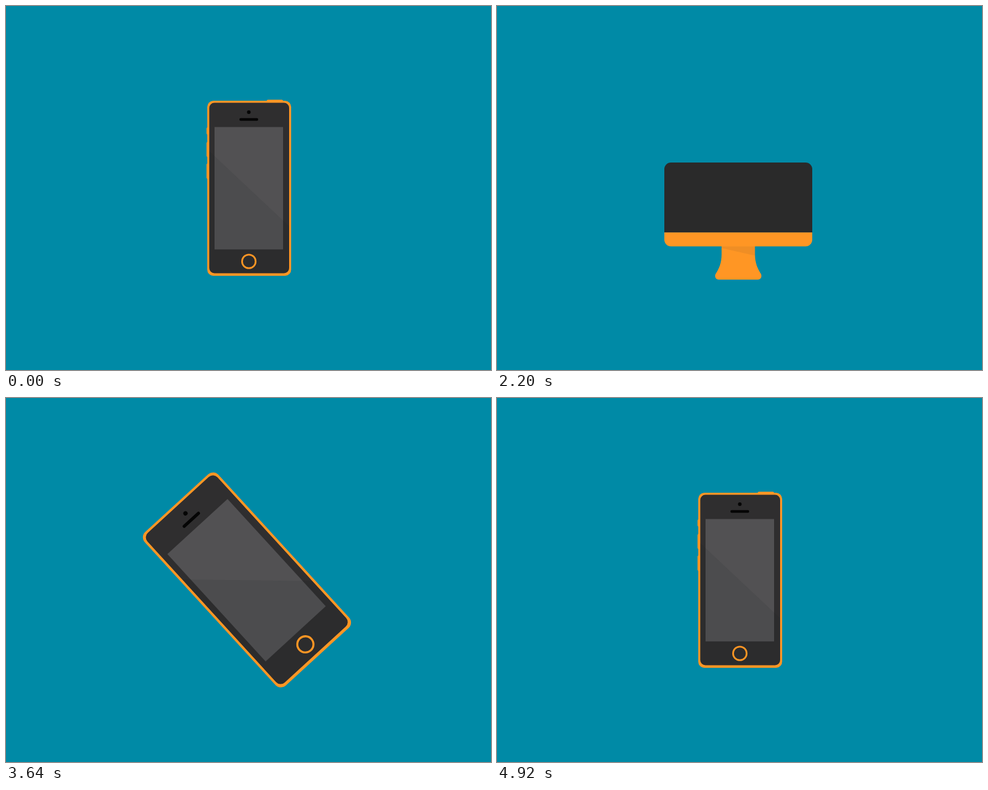
These frames come from a looping animation (800 px wide and 600 px high, 6440 ms). An HTML page with a canvas:

```html
<!DOCTYPE html>
<html lang="en">
<head>
<meta charset="utf-8">
<title>Devices</title>
<style>
  html, body { margin: 0; width: 100%; height: 100%; overflow: hidden; background: #008aa6; }
  canvas { display: block; width: 800px; height: 600px; }
</style>
</head>
<body>
<canvas id="stage" width="800" height="600"></canvas>
<script>
const ctx = document.getElementById('stage').getContext('2d');
const LOOP = 6440, STEP = 40;
const TEAL = '#008aa6', ORANGE = '#ff9624', DARK = '#2f2e2f', DEEP = '#2a2a2a', GLASS = '#525153';
const SHADE = 'rgba(20,30,30,.09)';
const STAND = new Path2D('M370.5 395.5V409C370.5 424 366 433 361 441C358 446 361 451 366 451H430C435 451 438 446 435 441C430 433 425.5 424 425.5 409V395.5Z');

const sine = p => (1 - Math.cos(Math.PI * p)) / 2;
const linear = p => p;
const easeIn = p => p * p;
const easeOut = p => 1 - (1 - p) * (1 - p);

// Value at time t from a list of [time, value] steps.
function track(t, steps, ease = sine) {
  if (t <= steps[0][0]) return steps[0][1];
  for (let i = 1; i < steps.length; i++) {
    const [t0, v0] = steps[i - 1], [t1, v1] = steps[i];
    if (t < t1) return v0 + (v1 - v0) * ease((t - t0) / (t1 - t0));
  }
  return steps[steps.length - 1][1];
}

function box(x, y, w, h, color, radius = 0) {
  if (w <= 0 || h <= 0) return;
  ctx.fillStyle = color;
  ctx.beginPath();
  ctx.roundRect(x, y, w, h, radius);
  ctx.fill();
}

function poly(points, color) {
  ctx.fillStyle = color;
  ctx.beginPath();
  points.forEach(([x, y]) => ctx.lineTo(x, y));
  ctx.fill();
}

function circle(x, y, r) {
  ctx.beginPath();
  ctx.arc(x, y, r, 0, Math.PI * 2);
}

function placed(x, y, angle, sx, sy, draw, px = x, py = y) {
  ctx.save();
  ctx.translate(x, y);
  ctx.rotate(angle * Math.PI / 180);
  ctx.scale(sx, sy);
  ctx.translate(-px, -py);
  draw();
  ctx.restore();
}

// A square pops up, then drops to the landing height.
function drop(t, start, top, land) {
  const size = track(t, [[start - 40, 0], [start + 200, 10.4], [start + 320, 15]], linear);
  const y = track(t, [[start + 320, top], [start + 480, land]], easeIn);
  box(398 - size / 2, y - size / 2, size, size, ORANGE);
}

function stand(t) {
  const sx = track(t, [[700, .2], [800, 1.105], [880, 1.05], [1000, 1]]);
  const sy = track(t, [[700, .2], [840, .85], [1000, 1]])
           * track(t, [[3320, 1], [3420, .42]], easeIn);
  const pivot = t < 3320 ? 451 : 396;
  placed(398, pivot, 0, sx, sy, () => {
    ctx.fillStyle = ORANGE;
    ctx.fill(STAND);
    if (t >= 1600) poly([[370.5, 396], [425.5, 396], [425.5, 411.5], [370.5, 399]], 'rgba(60,60,60,.08)');
  });
}

function monitorBody(t) {
  const top = t < 2240
    ? track(t, [[2040, 373], [2200, 258], [2240, 230]], linear)
    : track(t, [[2240, 230], [2320, 204], [2440, 225], [2560, 220]], easeOut);
  const grow = track(t, [[3320, 244], [3440, 350]], easeIn);
  const left = 398 - grow / 2;
  const r = Math.min(11, Math.max(0, 373 - top));
  box(left, top, grow, 373.5 - top, t < 2280 ? DEEP : DARK, [r, r, 0, 0]);

  const glass = track(t, [[2260, 0], [2520, 118.5]], easeOut);
  box(left + 16, 358.5 - glass, grow - 32, glass, GLASS);
  if (t >= 2280) {
    ctx.save();
    ctx.beginPath();
    ctx.roundRect(left, top, grow, 373 - top, [r, r, 0, 0]);
    ctx.clip();
    poly([[left, 220], [294, 220], [464, 373], [left, 373]], SHADE);
    ctx.restore();
  }
}

function monitor(t, angle) {
  placed(398, 308, angle, 1, 1, () => {
    stand(t);
    if (t >= 2040) monitorBody(t);
    if (t >= 1400) {
      const w = t < 3320
        ? track(t, [[1400, 15], [1560, 76], [1960, 244]])
        : track(t, [[3320, 246], [3440, 352]], easeIn);
      const h = track(t, [[1400, 15], [1640, 23]]);
      box(398 - w / 2, 396.3 - h, w, h, ORANGE, [0, 0, Math.min(11, h / 2), Math.min(11, h / 2)]);
    }
  });
}

function phone(t, x, y, angle, scale) {
  placed(x, y, angle, scale, scale, () => {
    const pop = start => track(t, [[start, -3], [start + 80, 3], [start + 240, 1.5]]);
    [[200, 12, 3840], [224, 25, 3980], [259.5, 25.5, 4080]].forEach(([top, h, start]) =>
      box(332.3 - pop(start), top, 6, h, ORANGE, 2));
    box(430, 156 - pop(3760), 27, 6, ORANGE, 2);

    box(332, 156.3, 138.3, 288.4, ORANGE, 10);
    box(335.3, 159.6, 131.7, 281, DARK, 8.5);
    box(344, 199.6, 113, 201.6, GLASS);
    ctx.save();
    ctx.beginPath();
    ctx.roundRect(335.3, 159.6, 131.7, 281, 8.5);
    ctx.clip();
    poly([[335, 239], [467, 363], [467, 441], [335, 441]], SHADE);
    ctx.restore();

    ctx.fillStyle = '#050505';
    circle(400.5, 175, 3);
    ctx.fill();
    box(385, 184.8, 31, 4.4, '#050505', 2.2);
    ctx.strokeStyle = ORANGE;
    ctx.lineWidth = 2.8;
    circle(400.6, 421, 11.2);
    ctx.stroke();
  }, 401, 300.5);
}

function draw(time) {
  const t = time < STEP ? time + LOOP : time;
  box(0, 0, 800, 600, TEAL);
  if (t < 240) return;

  const angle = track(t, [[3320, -90], [3980, 9.8], [4320, -5], [4640, 3], [4920, 0]]);
  if (t < 3440) {
    if (t < 720) drop(t, 240, 323.5, 443);
    else monitor(t, angle + 90);
    if (t >= 920 && t < 1400) drop(t, 920, 315.5, 388);
    return;
  }
  const spin = track(t, [[3320, 0], [3980, 1]]);
  const scale = t < 3980 ? 1.21 - .185 * spin ** 3 : track(t, [[3980, 1.025], [4320, 1]]);
  phone(t, 394 + 7 * spin, 299.5 + spin, angle, scale);
}

function tick() {
  const time = performance.now() % LOOP;
  draw(Math.floor(time / STEP) * STEP);
  requestAnimationFrame(tick);
}
tick();
</script>
</body>
</html>
```
